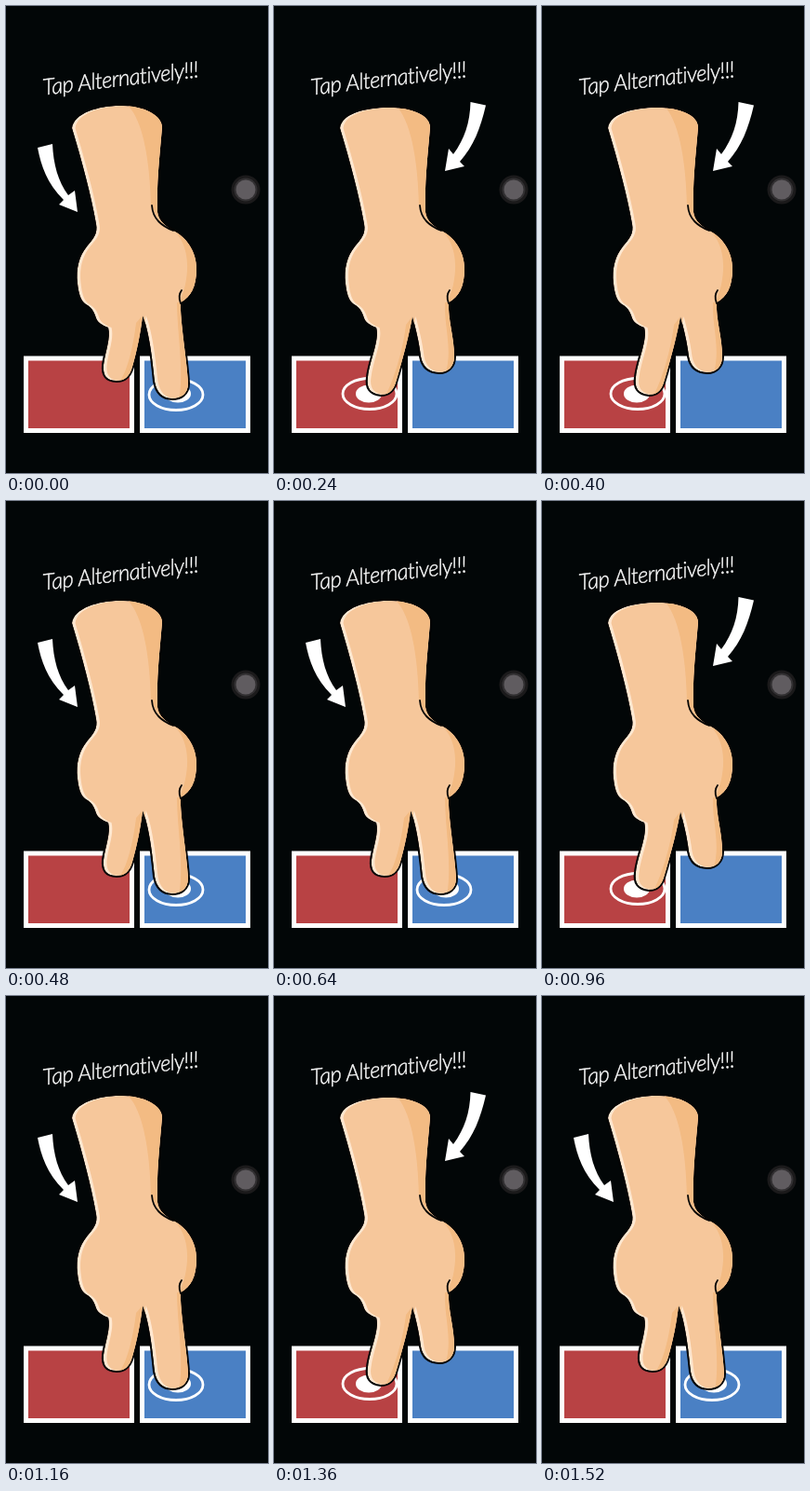
These frames come from a looping animation (282x501 px, 1600 ms). An HTML page with a canvas:

```html
<!DOCTYPE html>
<html lang="en">
<head>
<meta charset="utf-8">
<title>Tap Alternatively</title>
<style>
  html, body { margin: 0; width: 100%; height: 100%; overflow: hidden; background: #020607; }
  canvas { display: block; width: 100vw; height: 100vh; }
</style>
</head>
<body>
<canvas id="stage"></canvas>
<script>
const W = 282, H = 501, LOOP = 1600;
const HOLD = LOOP / 6;       // three left/right pairs per loop
const FIRST_SWITCH = 173;

const canvas = document.getElementById('stage');
const ratio = window.devicePixelRatio || 1;
canvas.width = W * ratio;
canvas.height = H * ratio;
const ctx = canvas.getContext('2d');
ctx.scale(ratio, ratio);

const SKIN = '#f6c79b', SHADE = '#f3bb83', LIGHT = '#ffe7d0', INK = '#050505';

const palmLeft = `C 103 342 99 340 97 335 C 95 328 92 323 86 320
  C 80 316 78 307 77 298 C 75 281 79 268 87 258
  C 94 250 99 244 97 234 C 92 204 81 164 71 131 Z`;

const wrist = top => `M 71 131 C 73 115 99 ${top} 123 ${top}
  C 150 ${top} 168 118 168 130 C 165 165 162 190 163 221
  C 164 231 173 237 180 241 C 194 248 205 263 205 282 C 205 301 199 312 188 318`;

const poses = [
  {
    hand: new Path2D(`${wrist(107)} C 187 336 195 382 196 405
      C 196 416 188 421 179 421 C 168 421 162 414 160 403
      C 157 372 153 346 147 332 C 145 350 141 370 136 387
      C 133 398 127 402 119 402 C 108 402 104 396 105 385
      C 107 370 113 356 110 345 ${palmLeft}`),
    shade: new Path2D(`M 140 340 C 137 365 131 392 121 405 L 150 405 L 147 332 Z
      M 184 318 C 184 350 192 390 186 424 L 202 424 L 202 318 Z`),
    arrow: new Path2D(`M 34 152 L 50 148 C 51 170 56 188 67 203 L 74 198
      L 77 221 L 57 213 L 62 208 C 44 190 38 172 34 152 Z`),
    ripple: [183, 417, 185, 416]
  },
  {
    hand: new Path2D(`${wrist(109)} C 187 336 194 355 194 376
      C 194 387 187 393 178 393 C 167 393 160 387 158 376
      C 156 360 153 348 149 333 C 146 350 139 378 131 404
      C 128 414 122 417 115 417 C 104 416 99 410 101 398
      C 103 380 114 358 110 345 ${palmLeft}`),
    shade: new Path2D(`M 142 342 C 139 368 129 402 119 420 L 145 420 L 149 333 Z
      M 184 318 C 183 345 193 370 184 396 L 200 396 L 202 318 Z`),
    arrow: new Path2D(`M 211.5 103 L 228 106.5 C 222 132 215 150 200 167 L 205 172
      L 184 177 L 188 153 L 193 159 C 205 143 211 125 211.5 103 Z`),
    ripple: [103, 416, 102, 416]
  }
];

const bodyShade = new Path2D(`M 128 104 C 147 118 155 165 156 215 L 170 238 L 175 104 Z
  M 172 234 C 199 250 200 286 187 318 L 212 318 L 212 234 Z`);
const creases = new Path2D(`M 157 214 C 158 229 168 236 180 241
  M 189 305 C 186 309 186 314 188 319`);

function panel(x, color) {
  ctx.fillStyle = '#fff';
  ctx.fillRect(x, 375.5, 119, 82.5);
  ctx.fillStyle = color;
  ctx.fillRect(x + 5, 380.5, 109, 72.5);
}

function disc(x, y, rx, ry, color) {
  ctx.beginPath();
  ctx.ellipse(x, y, rx, ry, 0, 0, Math.PI * 2);
  ctx.fillStyle = color;
  ctx.fill();
}

function drawRipple([x, y, innerX, innerY]) {
  ctx.beginPath();
  ctx.ellipse(x, y, 29, 16.5, 0, 0, Math.PI * 2);
  ctx.strokeStyle = '#fff';
  ctx.lineWidth = 2.8;
  ctx.stroke();
  disc(innerX, innerY, 14, 9.5, '#fff');
}

function drawHand({ hand, shade }) {
  ctx.lineJoin = ctx.lineCap = 'round';
  ctx.strokeStyle = INK;
  ctx.lineWidth = 4;
  ctx.stroke(hand);
  ctx.save();
  ctx.clip(hand);
  ctx.fillStyle = LIGHT;
  ctx.fill(hand);
  ctx.save();
  ctx.translate(3.5, 0);
  ctx.fillStyle = SKIN;
  ctx.fill(hand);
  ctx.restore();
  ctx.fillStyle = SHADE;
  ctx.fill(bodyShade);
  ctx.fill(shade);
  ctx.restore();
  ctx.lineWidth = 1.8;
  ctx.stroke(creases);
}

function drawCaption() {
  const text = 'Tap Alternatively!!!';
  ctx.save();
  ctx.translate(40.5, 95.5);
  ctx.rotate(-0.115);
  ctx.fillStyle = ctx.strokeStyle = '#fff';
  ctx.font = 'italic 300 24px Lato, "Open Sans", sans-serif';
  ctx.letterSpacing = '-0.6px';
  ctx.lineWidth = 0.4;
  ctx.fillText(text, 0, 0);
  ctx.strokeText(text, 0, 0);
  ctx.restore();
}

function draw(time) {
  const step = Math.floor((time % LOOP - FIRST_SWITCH) / HOLD) + 1;
  const pose = poses[step % 2];
  ctx.fillStyle = '#020607';
  ctx.fillRect(0, 0, W, H);
  drawCaption();
  disc(258, 197, 15.5, 15.5, '#1b1a1b');
  disc(258, 197, 12.5, 12.5, '#323032');
  disc(258, 197, 10.5, 10.5, '#605c60');
  panel(19, '#b84244');
  panel(144, '#4a80c4');
  drawRipple(pose.ripple);
  drawHand(pose);
  ctx.fillStyle = '#fff';
  ctx.fill(pose.arrow);
}

let start;
function tick(now) {
  start ??= now;
  draw(Math.max(0, now - start));
  requestAnimationFrame(tick);
}
draw(0);
requestAnimationFrame(tick);
</script>
</body>
</html>
```
